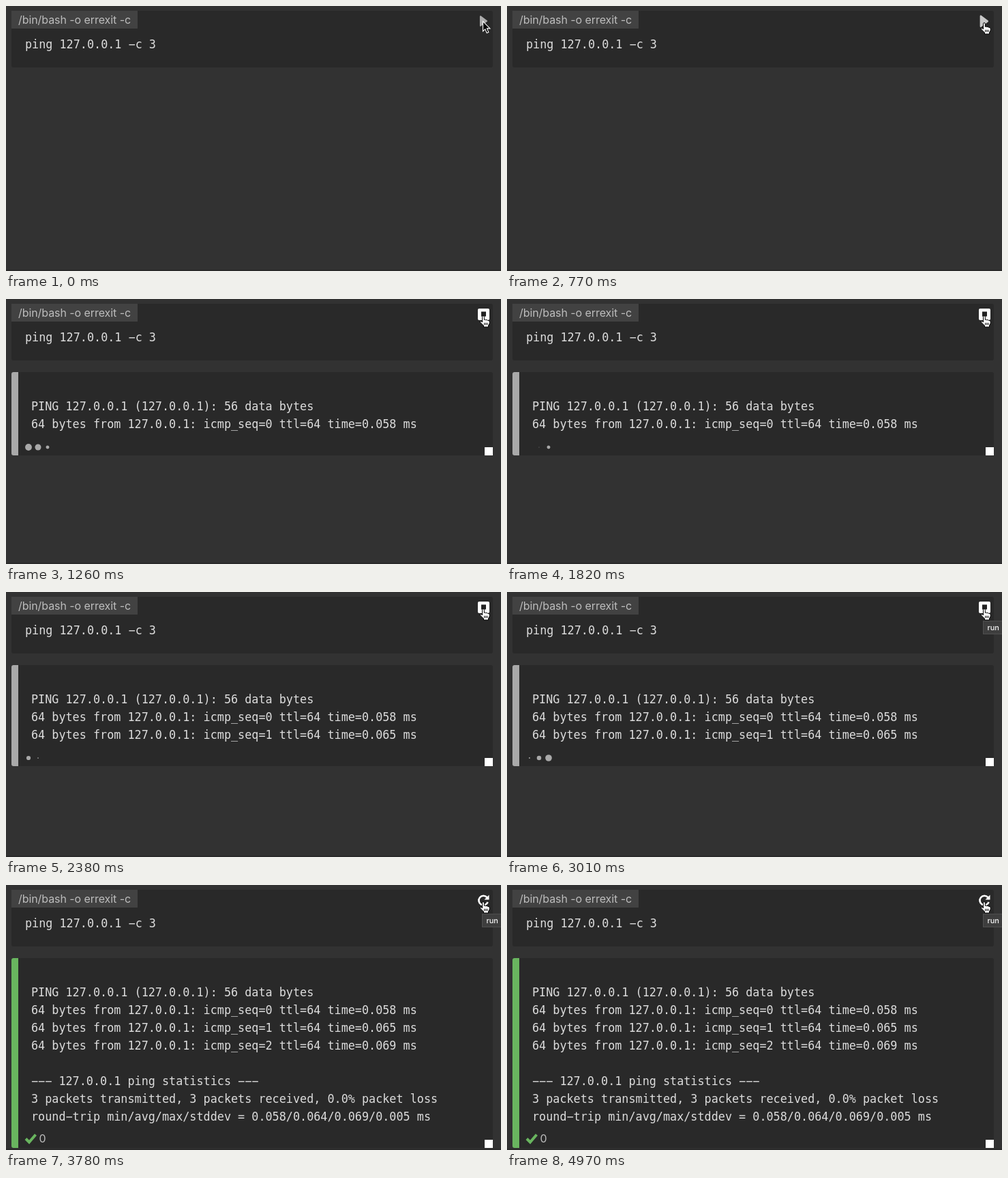
These frames come from a looping animation (726x388 px, 5110 ms). An HTML page:

```html
<!DOCTYPE html>
<html lang="en">
<head>
<meta charset="utf-8">
<style>
  html, body { margin: 0; width: 100%; height: 100%; overflow: hidden; background: #323232; }
  svg { display: block; }
  text { white-space: pre; }
  .mono { font: 16.8px "DejaVu Sans Mono", monospace; fill: #dcdcdc; }
  .ui { font: 16px Inter, sans-serif; fill: #bdbdbd; }
  .tip { font: 500 11px Inter, sans-serif; fill: #f4f4f4; }
</style>
</head>
<body>
<svg width="726" height="388" viewBox="0 0 726 388">
  <rect width="726" height="388" fill="#323232"/>
  <rect y="386" width="726" height="2" fill="#2b2b2b"/>

  <rect x="8" y="7" width="706" height="83" rx="3" fill="#292929"/>
  <rect x="8" y="7" width="185" height="26" fill="#424242"/>
  <text class="ui" x="18" y="26" letter-spacing="-0.07">/bin/bash -o errexit -c</text>
  <text class="mono" x="28" y="62">ping 127.0.0.1 −c 3</text>

  <g id="panel">
    <rect id="panelBox" x="8" y="107" width="706" rx="3" fill="#292929"/>
    <path id="bar"/>
    <g id="lines"></g>
    <g id="dots" fill="#a9a9a9"></g>
    <rect id="grip" x="702" width="12" height="12" fill="#fff"/>
    <g id="result">
      <path d="M29 371.5L34 376.5L43.5 365.5" fill="none" stroke="#69b55f" stroke-width="4"/>
      <text class="ui" x="48.5" y="377">0</text>
    </g>
  </g>

  <path id="play" d="M-5 -7.5L5 0L-5 7.5Z" stroke-width="2.4" stroke-linejoin="round"/>
  <g id="stop">
    <rect x="692" y="14" width="17" height="17" rx="2" fill="#fff"/>
    <rect x="697" y="18.5" width="7" height="7" fill="#222"/>
  </g>
  <g id="rerun">
    <path d="M705.4 18.2A6.8 6.8 0 1 0 706.6 25" fill="none" stroke="#fff" stroke-width="2.6"/>
    <path d="M708.5 14.5V21.5H701.5Z" fill="#fff"/>
  </g>

  <g id="tooltip">
    <rect x="698.5" y="42.5" width="34" height="19" fill="#3e3e3e" stroke="#4f4f4f"/>
    <text class="tip" x="704.5" y="56">run</text>
  </g>

  <path id="arrow" transform="translate(699.5 22.5)" fill="#000" stroke="#fff" stroke-width="1.1"
    d="M0 0V14.5L3.3 11.4L5.7 17L8.3 15.9L5.9 10.4H10.4Z"/>
  <g id="hand" transform="translate(694.5 24)" stroke="#000" stroke-width="1" stroke-linejoin="round">
    <path fill="#fff" d="M4 10V2.2Q4 .5 5.4 .5T6.8 2.2V6.5Q8 5.4 9.4 6.8Q10.9 5.8 12 7.4Q14.5 6.6 14.7 9.2V11.5L13 15V17H6V15L1.2 10.2Q.6 8.6 2 8.3Q3 8.4 4 10Z"/>
    <path fill="none" d="M7.2 10.8V14M9.3 10.8V14M11.4 10.8V14"/>
  </g>
</svg>
<script>
const LOOP = 5110, STEP = 70;
const HOVER = 770, START = 980, SECOND = 2030, TOOLTIP = 2590, DONE = 3080;
const NS = "http://www.w3.org/2000/svg";
const $ = id => document.getElementById(id);

function add(parent, tag, attrs, text = "") {
  const el = document.createElementNS(NS, tag);
  for (const key in attrs) el.setAttribute(key, attrs[key]);
  el.textContent = text;
  return parent.appendChild(el);
}
const set = (id, key, value) => $(id).setAttribute(key, value);
const show = (id, on) => set(id, "visibility", on ? "inherit" : "hidden");

// The minus sign gives the terminal's long dash
const reply = (seq, ms) => `64 bytes from 127.0.0.1: icmp_seq=${seq} ttl=64 time=${ms} ms`;
const output = [
  [START, "PING 127.0.0.1 (127.0.0.1): 56 data bytes"],
  [START, reply(0, "0.058")],
  [SECOND, reply(1, "0.065")],
  [DONE, reply(2, "0.069")],
  [DONE, ""],
  [DONE, "−−− 127.0.0.1 ping statistics −−−"],
  [DONE, "3 packets transmitted, 3 packets received, 0.0% packet loss"],
  [DONE, "round−trip min/avg/max/stddev = 0.058/0.064/0.069/0.005 ms"]
];
const lines = output.map(([at, text], i) => ({
  at, el: add($("lines"), "text", { class: "mono", x: 37, y: 163 + 26 * i }, text)
}));
const dots = [33, 47, 61].map(cx => add($("dots"), "circle", { cx }));

// Same curve as CSS ease-in-out: cubic-bezier(.42, 0, .58, 1)
function easeInOut(x) {
  let lo = 0, hi = 1, u;
  for (let i = 0; i < 20; i++) {
    u = (lo + hi) / 2;
    const bx = 1.26 * u * (1 - u) ** 2 + 1.74 * u * u * (1 - u) + u ** 3;
    if (bx < x) lo = u; else hi = u;
  }
  return u * u * (3 - 2 * u);
}

// Each dot grows and shrinks for 1120 ms of a 1400 ms cycle
function dotRadius(t, i) {
  const phase = (t - START + 320 - 160 * i + 1400) % 1400;
  return 5 * easeInOut(Math.max(0, 1 - Math.abs(phase - 560) / 560));
}

function render(t) {
  const running = t >= START && t < DONE;
  const done = t >= DONE;
  const hover = t >= HOVER;
  const bottom = done ? 385 : t >= SECOND ? 255 : 229;

  show("arrow", !hover);
  show("hand", hover);
  show("play", t < START);
  show("stop", running);
  show("rerun", done);
  show("tooltip", t >= TOOLTIP);

  const grow = Math.min(1, Math.max(0, (t - HOVER + STEP) / (3 * STEP)));
  const shade = Math.round(172 + 83 * grow);
  const playColor = `rgb(${shade},${shade},${shade})`;
  set("play", "transform", `translate(${700.5 - 2 * grow} ${22 + 0.5 * grow}) scale(${0.9 + 0.3 * grow})`);
  set("play", "fill", playColor);
  set("play", "stroke", playColor);

  show("panel", t >= START);
  show("result", done);
  show("dots", running);
  set("panelBox", "height", bottom - 107);
  set("bar", "d", `M18 107H11Q8 107 8 110V${bottom - 3}Q8 ${bottom} 11 ${bottom}H18Z`);
  set("bar", "fill", done ? "#69b55f" : "#a9a9a9");
  set("grip", "y", bottom - 12);
  for (const { at, el } of lines) el.setAttribute("visibility", t >= at ? "inherit" : "hidden");
  dots.forEach((dot, i) => {
    dot.setAttribute("cy", bottom - 12);
    dot.setAttribute("r", dotRadius(t, i));
  });
}

const began = performance.now();
function tick() {
  const t = (performance.now() - began) % LOOP;
  render(Math.floor(t / STEP) * STEP);
  requestAnimationFrame(tick);
}
tick();
</script>
</body>
</html>
```
